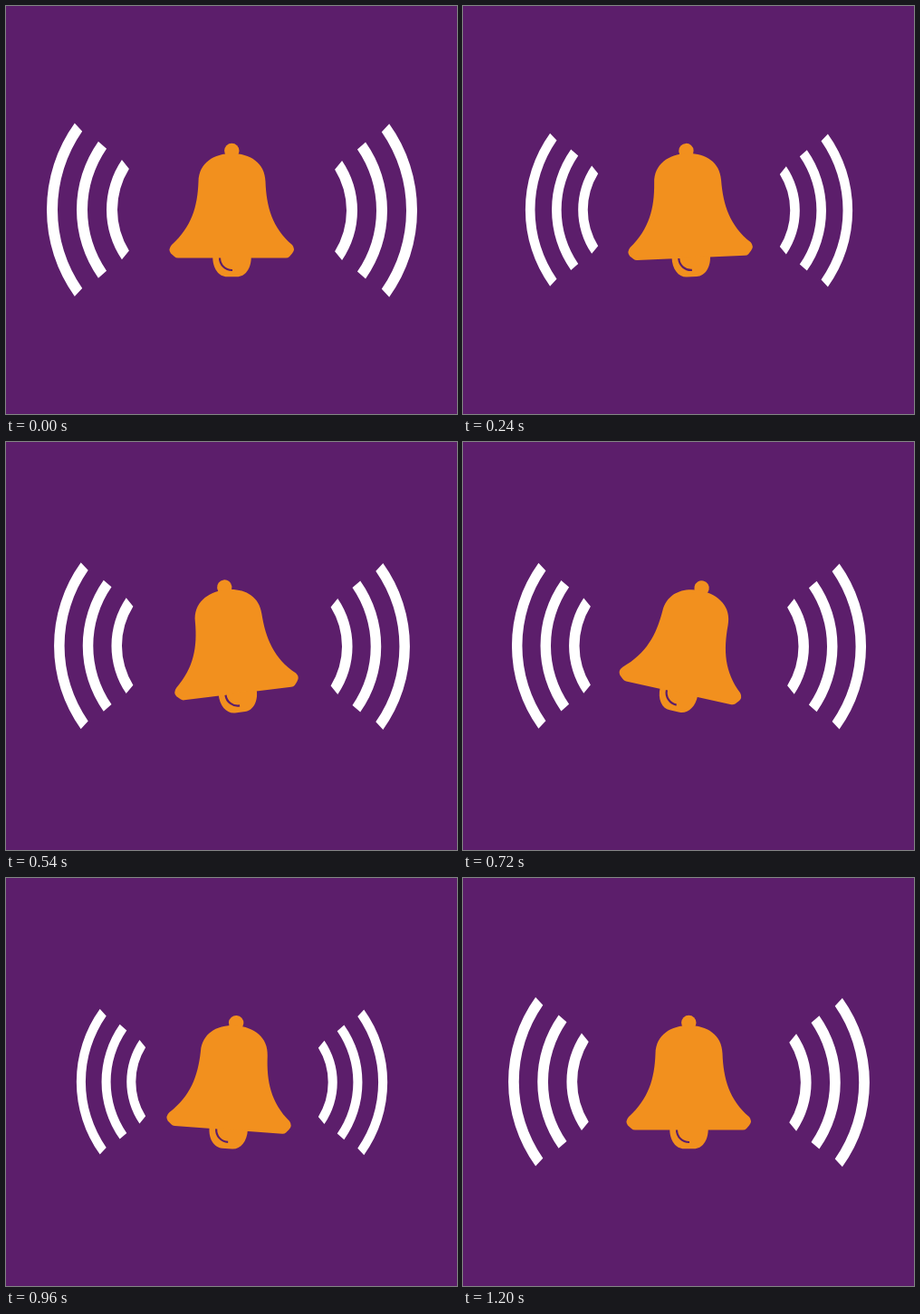
Recreate the animation shown at these times as an HTML page. Size 498 px wide and 451 px high, loop 1260 ms.

```html
<!DOCTYPE html>
<html lang="en">
<head>
<meta charset="utf-8">
<title>Ringing bell</title>
<style>
  html, body { margin: 0; width: 100%; height: 100%; overflow: hidden; background: #5c1e6b; }
  svg { display: block; width: 100%; height: 100%; }
</style>
</head>
<body>
<svg viewBox="0 0 498 451">
  <rect width="498" height="451" fill="#5c1e6b"/>
  <g id="waves" fill="#fff">
    <path id="side"/>
    <use href="#side" transform="translate(0 .8) scale(-1 1)"/>
  </g>
  <g id="bell" fill="#f2901e">
    <circle cx="249.3" cy="160" r="8.2"/>
    <path d="M249.5 163C269 163 286 173 286.5 194C287.5 222 294 245 316 264
      Q320 269 316 273.500L313 277Q311.500 278.500 309 278.500H190Q187.500 278.500 186 277L182 273.500
      Q178.500 269 183 264C205 244 211.500 222 212.500 194C213 173 230 163 249.5 163Z"/>
    <path d="M228.300 277H270.700C271 290 264 299.300 255 299.300H244C235 299.300 228 290 228.300 277Z"/>
    <path d="M236 278.500A13.500 13.500 0 0 0 250 292" fill="none" stroke="#5c1e6b" stroke-width="2.200"/>
  </g>
</svg>
<script>
  const STEP = 60, STEPS = 21;
  const waves = document.getElementById('waves');
  const bell = document.getElementById('bell');

  // Band of a ring facing left; a and b are the half angles of its outer and inner edge.
  function band(r, a, b) {
    const cx = -40.5, w = 12, q = r - w;
    const pt = (rad, deg) => {
      const t = deg * Math.PI / 180;
      return `${cx - rad * Math.cos(t)} ${-rad * Math.sin(t)}`;
    };
    return `M${pt(r, a)}A${r} ${r} 0 0 0 ${pt(r, -a)}` +
      `L${pt(q, -b)}A${q} ${q} 0 0 1 ${pt(q, b)}Z`;
  }
  document.getElementById('side').setAttribute('d',
    band(164, 35.7, 34.8) + band(131, 35.2, 34.6) + band(98, 34.2, 31.8));

  // Bell angle in degrees over one pulse of 21 half steps.
  const swing = [[0, 0], [3, 12.5], [4, 7.6], [7, -8], [10, 8.5], [11, 4.2],
    [12, 0], [16, -13], [18, -7], [19, 0], [21, 0]];

  function tween(keys, x) {
    const i = keys.findIndex(k => k[0] > x);
    const [x0, y0] = keys[i - 1], [x1, y1] = keys[i];
    return y0 + (y1 - y0) * (x - x0) / (x1 - x0);
  }

  function draw(now) {
    const phase = 2 * (Math.floor(now / STEP) % STEPS) % 21;
    // The pulse shrinks for 11 half steps and grows back slightly faster.
    const shrink = phase < 12 ? phase : 20.7 - phase;
    const scale = 1 - 0.0146 * shrink;
    waves.setAttribute('transform', `translate(249.5 225.2) scale(${scale})`);
    bell.setAttribute('transform', `rotate(${tween(swing, phase)} 249.5 226)`);
  }

  let start;
  function tick(now) {
    start ??= now;
    draw(now - start);
    requestAnimationFrame(tick);
  }
  draw(0);
  requestAnimationFrame(tick);
</script>
</body>
</html>
```
